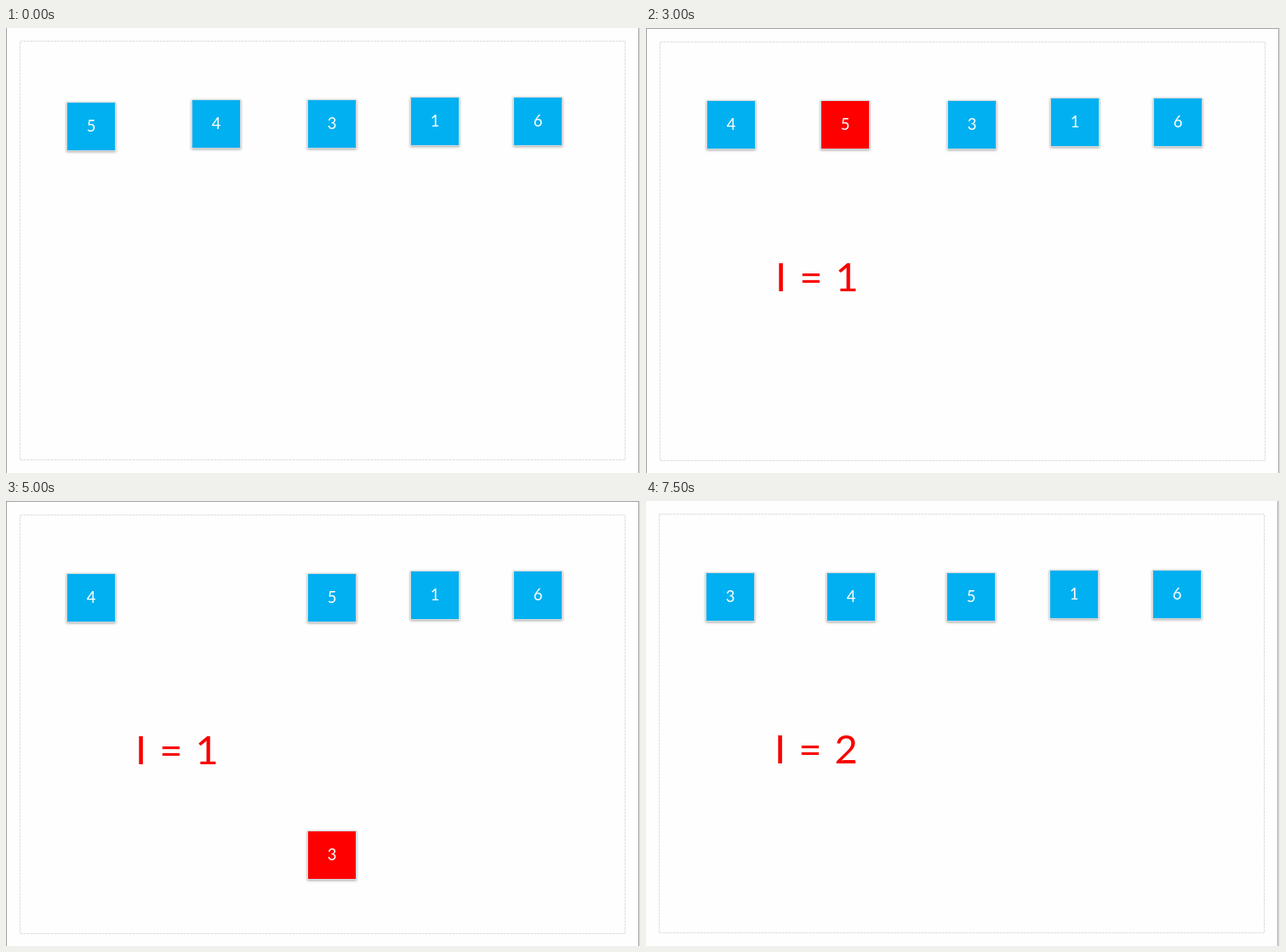
An HTML page with a canvas for the animation above (8000 ms loop, 745 px wide and 524 px high).

```html
<!DOCTYPE html>
<html lang="en">
<head>
<meta charset="utf-8">
<title>Insertion sort</title>
<style>
  html, body { margin: 0; width: 100%; height: 100%; overflow: hidden; background: #fefefe; }
  canvas { display: block; }
</style>
</head>
<body>
<canvas id="stage" width="745" height="524"></canvas>
<script>
const ctx = document.getElementById('stage').getContext('2d');
const STEP = 500;
const FONT = 'Lato, Carlito, sans-serif';

// Places on the page, relative to the dashed margin
const SPOTS = {
  a: [55, 72], b: [202, 69], c: [338, 69], d: [459, 66], e: [580, 66],
  A: [55, 69], B: [189, 69], C: [197, 69],
  p: [189, 364], q: [338, 372], r: [197, 393], s: [55, 393]
};

// Margin x and y, value of I, highlighted digit, digits with their spots
const STEPS = [
  [16, 15, 0, 0, '5a 4b 3c'],
  [16, 16, 1, 0, '5a 4b 3c'],
  [17, 16, 1, 4, '5a 4b 3c'],
  [16, 15, 1, 4, '5a 4p 3c'],
  [15, 17, 1, 4, '5B 4p 3c'],
  [16, 18, 1, 4, '4A 5B 3c'],
  [16, 16, 1, 5, '4A 5B 3c'],
  [16, 17, 2, 3, '4A 5B 3c'],
  [15, 16, 2, 3, '4A 5B 3q'],
  [16, 18, 2, 3, '4A 5c 3q'],
  [16, 16, 1, 3, '4A 5c 3q'],
  [15, 15, 1, 3, '4A 5c 3r'],
  [15, 15, 1, 3, '4C 5c 3r'],
  [16, 16, 1, 3, '4C 5c 3s'],
  [16, 17, 1, 3, '3A 4C 5c'],
  [15, 15, 2, 0, '3A 4C 5c']
];

function drawPage(x, y) {
  ctx.fillStyle = '#e4e4e4';
  ctx.fillRect(0, 0, 745, 524);
  ctx.fillStyle = '#a3a3a3';
  ctx.fillRect(x - 16, y - 16, 744, 600);
  ctx.fillStyle = '#fefefe';
  ctx.fillRect(x - 15, y - 15, 742, 600);
  ctx.strokeStyle = '#dcdcdc';
  ctx.lineWidth = 1;
  ctx.setLineDash([3, 1]);
  ctx.strokeRect(x + 0.5, y + 0.5, 711, 493);
  ctx.setLineDash([]);
}

function drawBox(x, y, digit, color) {
  ctx.save();
  ctx.shadowColor = 'rgba(0, 0, 0, .35)';
  ctx.shadowBlur = 3;
  ctx.shadowOffsetY = 1;
  ctx.fillStyle = '#d3dade';
  ctx.fillRect(x, y, 58, 58);
  ctx.restore();
  ctx.fillStyle = color;
  ctx.fillRect(x + 1, y + 1, 56, 56);
  ctx.fillStyle = '#fff';
  ctx.font = '18.5px ' + FONT;
  ctx.textAlign = 'center';
  ctx.fillText(digit, x + 29, y + 35);
}

function drawCounter(x, y, value) {
  ctx.fillStyle = '#f80000';
  ctx.font = '47px ' + FONT;
  ctx.textAlign = 'left';
  ctx.wordSpacing = '3px';
  ctx.fillText('I = ' + value, x + 136, y + 294);
  ctx.wordSpacing = '0px';
}

function draw(now) {
  const step = Math.floor(now / STEP) % STEPS.length;
  const [x, y, counter, hot, layout] = STEPS[step];
  drawPage(x, y);
  for (const [digit, spot] of (layout + ' 1d 6e').split(' ')) {
    const [dx, dy] = SPOTS[spot];
    drawBox(x + dx, y + dy, digit, +digit === hot ? '#ff0000' : '#00b0f0');
  }
  if (counter) drawCounter(x, y, counter);
  requestAnimationFrame(draw);
}

requestAnimationFrame(draw);
</script>
</body>
</html>
```
